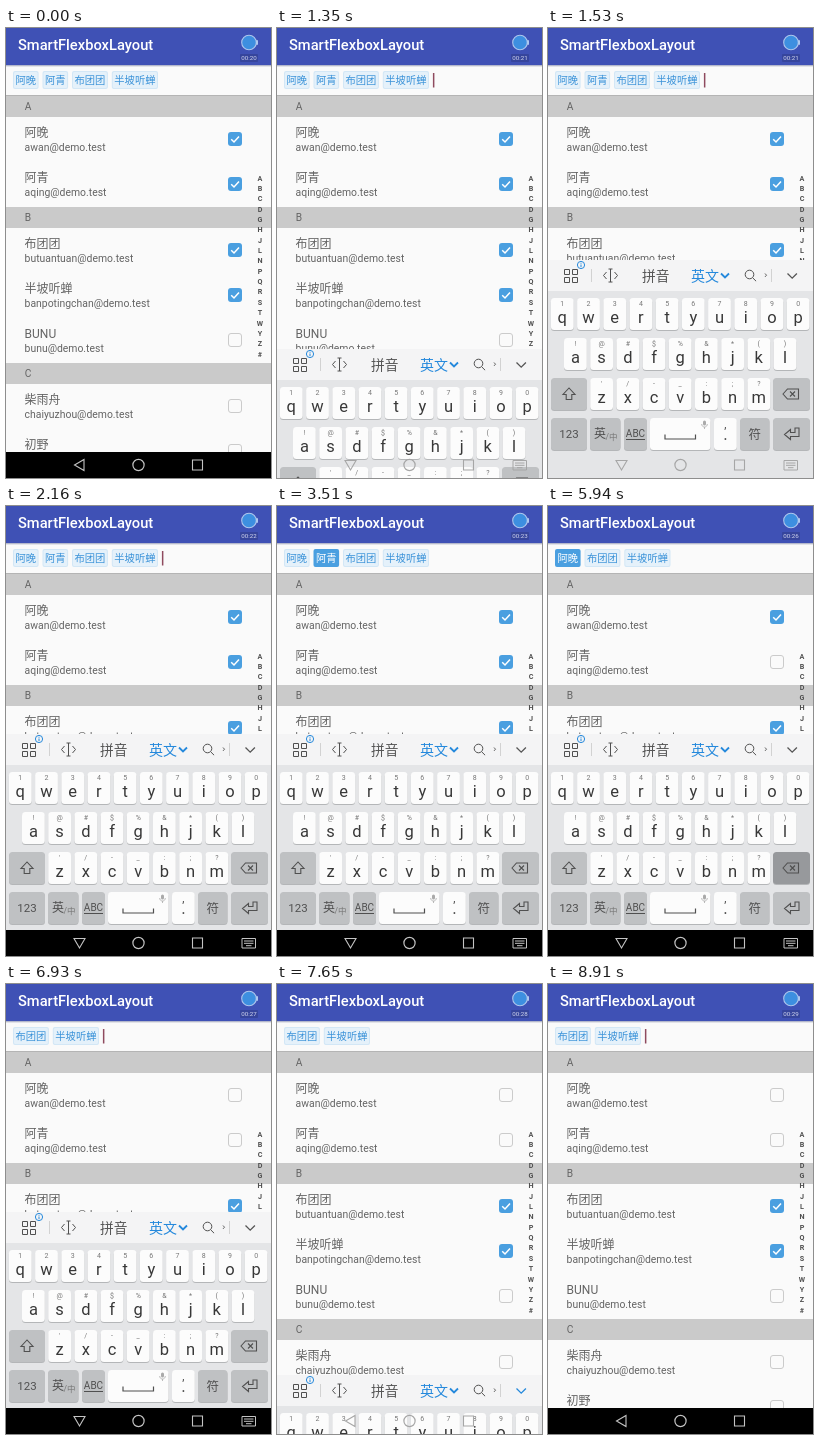
Write an HTML page with a canvas that moves like this. It is 265x450 px and loops after 9 s.

```html
<!DOCTYPE html>
<html lang="zh">
<head>
<meta charset="utf-8">
<title>Contact chips</title>
<style>
html, body { margin: 0; width: 100%; height: 100%; overflow: hidden; background: #fafafa }
canvas { display: block; width: 265px; height: 450px }
</style>
</head>
<body>
<canvas id="stage"></canvas>
<script>
const W = 265, H = 450, LOOP = 9000, STEP = 90, BLINK = 945;
const FONT = 'Roboto, "Noto Sans CJK SC", "Noto Sans CJK", sans-serif';
const BLUE = '#4a9fe0', INK = '#646464';

const canvas = document.getElementById('stage');
const ctx = canvas.getContext('2d');
const ratio = window.devicePixelRatio || 1;
canvas.width = W * ratio;
canvas.height = H * ratio;
ctx.scale(ratio, ratio);

const contacts = [
  ['A', '阿晚', 'awan'], ['A', '阿青', 'aqing'],
  ['B', '布团团', 'butuantuan'], ['B', '半坡听蝉', 'banpotingchan'], ['B', 'BUNU', 'bunu'],
  ['C', '柴雨舟', 'chaiyuzhou'], ['C', '初野', 'chuye']
];
// Each contact that starts checked: when its chip is selected and removed
const chips = [
  { name: '阿晚', select: 5490, remove: 6030 },
  { name: '阿青', select: 3240, remove: 4230 },
  { name: '布团团' },
  { name: '半坡听蝉' }
];

function text(str, x, y, size, color, align = 'left', weight = 400) {
  ctx.font = `${weight} ${size}px ${FONT}`;
  ctx.textAlign = align;
  ctx.fillStyle = color;
  ctx.fillText(str, x, y);
}

function rect(x, y, w, h, color, radius = 0) {
  ctx.fillStyle = color;
  ctx.beginPath();
  ctx.roundRect(x, y, w, h, radius);
  ctx.fill();
}

function stroke(d, color, width = 1) {
  ctx.strokeStyle = color;
  ctx.lineWidth = width;
  ctx.stroke(new Path2D(d));
}

function ring(x, y, r, color, width = 1) {
  ctx.strokeStyle = color;
  ctx.lineWidth = width;
  ctx.beginPath();
  ctx.arc(x, y, r, 0, 7);
  ctx.stroke();
}

const between = (t, a, b) => t >= a && t < b;
const smooth = (t, a, b) => {
  const p = Math.min(1, Math.max(0, (t - a) / (b - a)));
  return p * p * (3 - 2 * p);
};

function checkbox(x, y, on) {
  if (on) {
    rect(x, y, 14, 14, BLUE, 3);
    stroke(`M${x + 3.2} ${y + 7.2}l2.8 2.8 5-5.6`, '#fff', 1.5);
  } else {
    ctx.strokeStyle = '#cbcbcb';
    ctx.lineWidth = 1;
    ctx.beginPath();
    ctx.roundRect(x + .5, y + .5, 13, 13, 2.5);
    ctx.stroke();
  }
}

function drawList(t) {
  let y = 68, section = '';
  for (const [letter, name, mail] of contacts) {
    if (letter !== section) {
      section = letter;
      rect(0, y, W, 21, '#cacaca');
      text(letter, 18.8, y + 14.4, 10.2, INK);
      y += 21;
    }
    text(name, 18.6, y + 20.2, 12, INK);
    text(mail + '@demo.test', 18.6, y + 34.4, 10.4, INK);
    const chip = chips.find(c => c.name === name);
    checkbox(222, y + 15, chip && !(t >= chip.remove));
    y += 45;
  }
  rect(0, 67, W, 1, '#b4b4b4');
  [...'ABCDGHJLNPQRSTWYZ#'].forEach((c, i) =>
    text(c, 254, 152.6 + i * 10.35, 7.2, '#505050', 'center', 700));
}

function cursorOn(t) {
  const start = t < 4185 ? 158 : t < 5985 ? 4185 : 5985;
  return t >= start && (t - start) % BLINK < BLINK / 2;
}

function drawChips(t) {
  let x = 7, selecting = false;
  for (const { name, select, remove } of chips) {
    if (t >= remove) continue;
    const selected = t >= select, w = name.length * 10.3 + 5;
    selecting ||= selected;
    rect(x, 43, w, 18, selected ? BLUE : '#d3e7f6', 2);
    if (!selected) rect(x + 1, 44, w - 2, 16, '#e5f1fa', 1.5);
    text(name, x + 2.5, 56, 10.3, selected ? '#fff' : '#3a92d8');
    x += w + 3.9;
  }
  if (!selecting && cursorOn(t)) rect(x, 45, 1.5, 14.5, '#8f4a5e');
}

function drawHeader(t) {
  rect(0, 0, W, 37, '#3f51b5');
  rect(0, 37, W, 1, '#b4b8cc');
  rect(0, 38, W, 1, '#e2e3e8');
  text('SmartFlexboxLayout', 12, 22, 14.7, '#fff', 'left', 500);
  rect(236, 7.5, 14, 14, '#3d8fe0', 7);
  ring(243, 14.5, 7.3, '#adc8ef', 1.1);
  rect(250, 12, 2, 5, '#adc8ef', 1);
  rect(234, 26, 18, 8, '#36459c', 1);
  text('00:' + (20 + Math.floor(Math.max(0, t - 45) / BLINK)), 243, 32.2, 6.2, '#d5d9ef', 'center');
}

function key(x, y, w, color = '#fcfcfc') {
  rect(x, y + 1, w, 32, '#b4b6b8', 3.5);
  rect(x, y, w, 32, color, 3.5);
}

function keyRow(letters, marks, x, y) {
  [...letters].forEach((c, i) => {
    const cx = x + i * 26.2;
    key(cx - 11.4, y, 22.8);
    text(marks[i], cx, y + 8.3, 7, '#777', 'center');
    text(c, cx, y + 24.7, 16.5, '#383838', 'center');
  });
}

// Drawn with the toolbar's top edge at y = 0
function drawKeyboard(t) {
  const gray = '#bfc1c3', dark = '#505050', blue = '#2589dc';
  rect(0, 0, W, 260, '#e4e5e7');
  rect(0, 0, W, 31, '#f4f4f5');

  stroke('M16.5 9.5h5v5h-5zM24.5 9.5h5v5h-5zM16.5 17.5h5v5h-5zM24.5 17.5h5v5h-5z', dark);
  rect(29, 1, 8, 8, '#f4f4f5', 4);
  ring(33, 5, 3.6, blue);
  stroke('M33 4.5v2.6M33 2.8v.9', blue);
  stroke('M43.5 9v13M223.5 9v13', '#d2d2d2');
  stroke('M62.5 9v13M60.5 9h4M60.5 22h4M58.5 12l-3 3.5 3 3.5M66.5 12l3 3.5-3 3.5', dark);
  text('拼音', 94, 20.5, 13.7, '#555');
  text('英文', 143, 20.5, 14, blue);
  stroke('M173 13.5l4 4 4-4', blue, 1.8);
  ring(201.5, 14.5, 4.3, dark);
  stroke('M204.7 17.8l3.4 3.4', dark);
  stroke('M217 13.5l1.5 1.7-1.5 1.7', dark, .9);
  stroke('M239.5 13.5l4.7 4.7 4.7-4.7', t >= 7380 ? blue : '#555', 1.3);

  keyRow('qwertyuiop', '1234567890', 14.3, 38);
  keyRow('asdfghjkl', '!@#$%&*()', 27.4, 78);
  keyRow('zxcvbnm', "'/-_:;?", 53.6, 118);

  const deleting = between(t, 4140, 4230) || between(t, 5940, 6030);
  key(3, 118, 36, gray);
  stroke('M21 128l-6 6.5h3.2v5h5.6v-5h3.2z', dark, 1.1);
  key(225, 118, 37, deleting ? '#97999c' : gray);
  stroke('M235 134l4.5-5h11v10h-11zM242 131.5l5 5M247 131.5l-5 5', dark, 1.1);

  key(3, 158, 36, gray);
  text('123', 21, 178.2, 11.5, dark, 'center');
  key(42, 158, 30.5, gray);
  text('英', 46, 178, 12, dark);
  text('/中', 57.5, 179.5, 8.5, '#777');
  key(76, 158, 23, gray);
  text('ABC', 87.5, 177, 10, dark, 'center');
  stroke('M78 179.5h19', dark);
  key(102, 158, 60.5);
  stroke('M117 174.5v4.5h30.5v-4.5', dark, 1.2);
  rect(155, 160.5, 3, 5, '#aaa', 1.5);
  stroke('M153.7 164c0 4 5.6 4 5.6 0M156.5 167v2', '#aaa', .8);
  key(166, 158, 22.8);
  text(',', 177.4, 168, 10, dark, 'center', 500);
  text('.', 177.4, 179.5, 14, dark, 'center', 500);
  key(192, 158, 29.5, gray);
  text('符', 206.8, 178.5, 12.5, dark, 'center');
  key(225, 158, 37, gray);
  stroke('M247 168h4v8.5h-8.5v3l-6-5 6-5v3h4.5z', dark, 1.1);
}

function drawNav(typing, sliding) {
  if (!sliding) rect(0, 424, W, 26, '#000');
  const color = sliding ? '#a6a6a6' : '#c4c4c4';
  stroke(typing ? 'M68 432.5h11l-5.5 9.5z' : 'M78 431.5v11l-9.5-5.5z', color, 1.1);
  ring(132.5, 437, 5.6, color, 1.2);
  stroke('M186.5 432h10v10h-10z', color, 1.1);
  if (typing) stroke('M236 432.5h13.5v9.5h-13.5zM238 435h9.5M238 437.3h9.5M240 439.7h5.5', color);
}

function draw(t) {
  rect(0, 0, W, H, '#fafafa');
  drawList(t);
  drawHeader(t);
  drawChips(t);
  const shown = smooth(t, 1080, 1568) - smooth(t, 7380, 7788);
  if (shown > 0) {
    ctx.save();
    ctx.translate(0, Math.round(H - 222 * shown));
    drawKeyboard(t);
    ctx.restore();
  }
  drawNav(between(t, 990, 7380), between(t, 990, 1600) || between(t, 7380, 7900));
}

function tick() {
  draw(Math.floor(performance.now() % LOOP / STEP) * STEP);
  requestAnimationFrame(tick);
}
tick();
</script>
</body>
</html>
```
